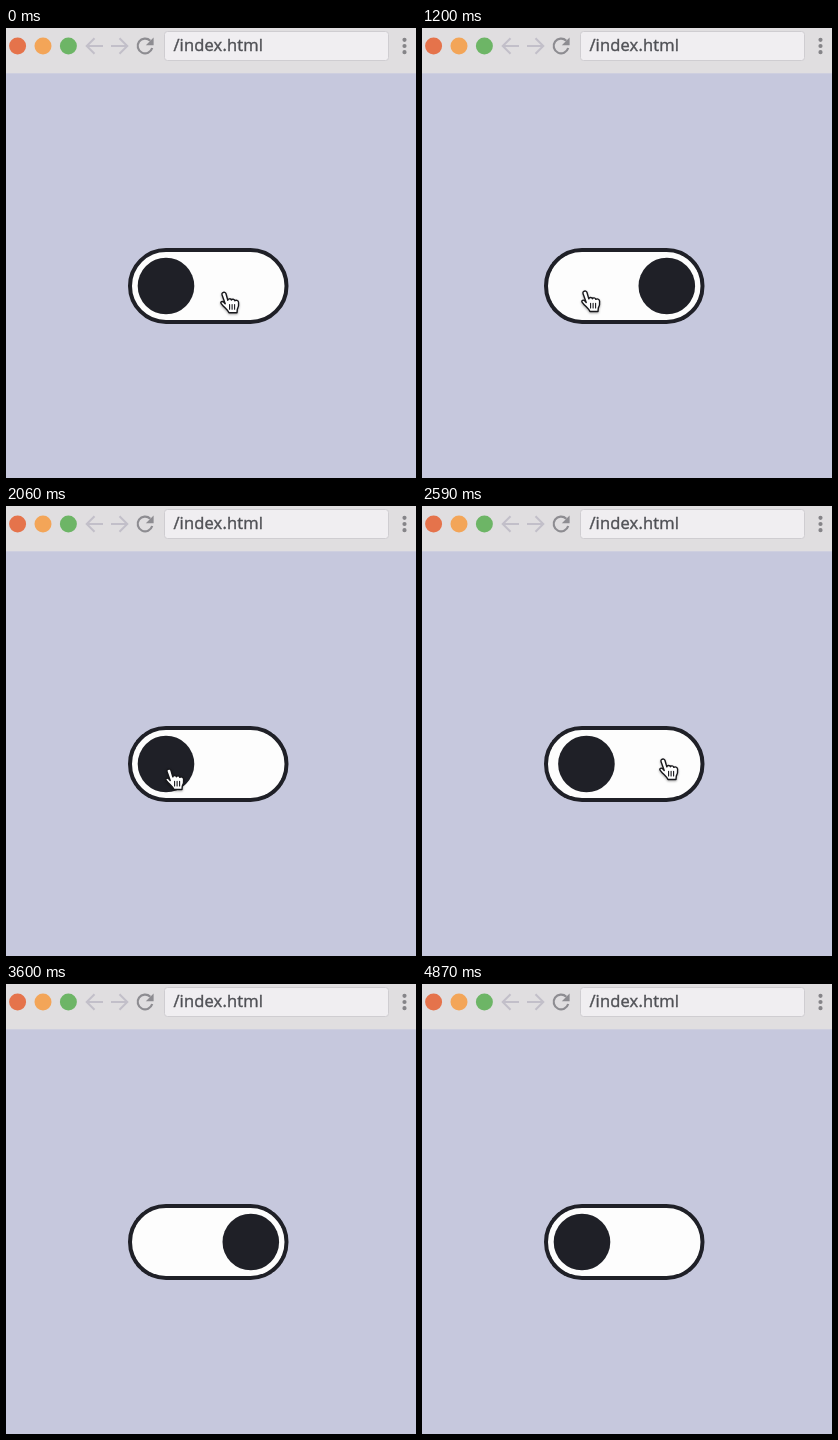
An HTML page that plays this animation: 410 px wide and 450 px high, repeating every 4.94 s.

```html
<!DOCTYPE html>
<html lang="en">
<head>
<meta charset="utf-8">
<title>Toggle switch</title>
<style>
  html, body { margin: 0; width: 100%; height: 100%; overflow: hidden; background: #c6c8dd; }
  svg { display: block; width: 100vw; height: 100vh; }
  text { font: 16.5px "Open Sans", "Noto Sans", sans-serif; letter-spacing: .16px; fill: #4f5055; stroke: #4f5055; stroke-width: .4px; }
  #hand { filter: drop-shadow(0 1px .8px rgba(0, 0, 0, .35)); }
</style>
</head>
<body>
<svg viewBox="0 0 410 450">
  <rect width="410" height="450" fill="#c6c8dd"/>
  <rect width="410" height="45.3" fill="#e0dee0"/>

  <circle cx="11.6" cy="18" r="8.5" fill="#e5734b"/>
  <circle cx="37" cy="18" r="8.5" fill="#f3a558"/>
  <circle cx="62.4" cy="18" r="8.5" fill="#6db566"/>

  <g fill="none" stroke="#c2bfc9" stroke-width="2">
    <path d="M97 18H81M88.5 10.2L80.7 18L88.5 25.8"/>
    <path d="M105 18H121M113.5 10.2L121.3 18L113.5 25.8"/>
  </g>
  <path d="M144.3 12.7A7.4 7.4 0 1 0 146.2 20" fill="none" stroke="#8d8c91" stroke-width="2.2"/>
  <path d="M147.6 9.4V17.2H139.8Z" fill="#8d8c91"/>

  <rect x="158.5" y="3.5" width="224" height="29" rx="3" fill="#f0eef1" stroke="#cfcdd1"/>
  <text x="167.4" y="23">/index.html</text>
  <path d="M398.5 11.8h0M398.5 18h0M398.5 24.2h0" stroke="#858488" stroke-width="4.2" stroke-linecap="round"/>

  <rect x="124" y="222" width="156.5" height="72" rx="36" fill="#fdfdfd" stroke="#1f2027" stroke-width="4"/>
  <circle id="knob" cy="258" r="28.3" fill="#1f2027"/>

  <g id="hand" stroke="#18181c" stroke-linecap="round" stroke-linejoin="round">
    <path fill="#fff" stroke-width="1.4" d="M3 1.5C4.2 .6 5.8 1.2 6.2 2.6L8 9C8.2 7.3 11.2 7.1 11.6 8.8C12.2 7.6 14.6 7.7 15 9.5C16 8.5 18.6 9 18.8 11.2C19.2 14 18.6 16 17.5 18.2L17.2 21.6H9.2C8.4 19.5 6 17.5 4.2 15.6C2.5 13.8 .8 12.3 1 11.2C1.3 9.9 3 10 4 11L5.4 12.6L2.2 3.6C1.9 2.7 2.3 1.9 3 1.5Z"/>
    <path fill="none" stroke-width="1.1" d="M9.8 13.3V18M12.3 13.3V18M14.8 13.3V18"/>
  </g>
</svg>
<script>
const LOOP = 4940;
const LEFT = 160, RIGHT = 244.8;
const SLIDE = 500;
const HAND_OFF = 3530;

const knob = document.getElementById("knob");
const hand = document.getElementById("hand");
const clamp = v => Math.min(1, Math.max(0, v));

// cubic-bezier(.4, 0, .2, 1)
function ease(u) {
  let lo = 0, hi = 1;
  for (let i = 0; i < 24; i++) {
    const s = (lo + hi) / 2, r = 1 - s;
    if (1.2 * s * r * r + .6 * s * s * r + s * s * s < u) lo = s; else hi = s;
  }
  return hi * hi * (3 - 2 * hi);
}

// Share of a move that is done at time t
const done = (t, start, span) => ease(clamp((t - start) / span));

function knobX(t) {
  const on = done(t, 330, SLIDE) - done(t, 1544, SLIDE)
           + done(t, 2523, SLIDE) - done(t, 4040, SLIDE / 2);
  return LEFT + (RIGHT - LEFT) * on;
}

function handAt(t) {
  const toLeft = done(t, 60, 140);
  const toRight = done(t, 2200, 190);
  const away = done(t, 3380, 150);
  return [
    213.8 - 55 * toLeft + 78 * toRight - 2 * away,
    263.2 - 1.3 * toLeft - 10 * toRight + 4 * away
  ];
}

function draw(t) {
  const [x, y] = handAt(t);
  knob.setAttribute("cx", knobX(t).toFixed(2));
  hand.setAttribute("transform", `translate(${x.toFixed(2)} ${y.toFixed(2)})`);
  hand.setAttribute("visibility", t < HAND_OFF ? "visible" : "hidden");
}

function frame() {
  draw(performance.now() % LOOP);
  requestAnimationFrame(frame);
}
frame();
</script>
</body>
</html>
```
